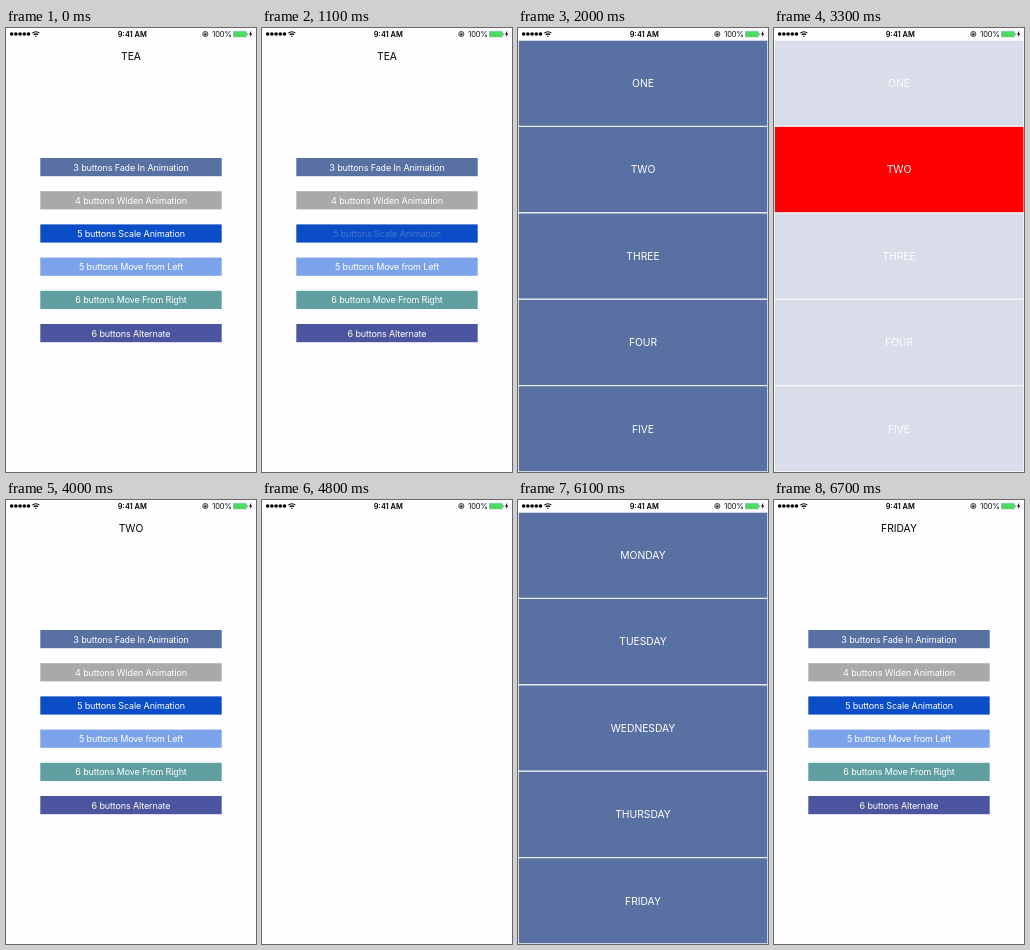
An HTML page that plays this animation: 250x444 px, repeating every 6.8 s.

```html
<!DOCTYPE html>
<html lang="en">
<head>
<meta charset="utf-8">
<title>Menu animations</title>
<style>
  html, body { margin: 0; width: 100%; height: 100%; overflow: hidden; background: #fefdff; }
  svg { display: block; width: 250px; height: 444px; }
  text { font: 10.3px Inter, Roboto, sans-serif; text-anchor: middle; }
  #buttons text { font-size: 9px; letter-spacing: -.13px; fill: #fff; }
  #rows text { fill: #fff; }
  #status text { font-size: 7.4px; }
</style>
</head>
<body>
<svg viewBox="0 0 250 444">
  <g id="menu">
    <text id="title" x="125" y="31.8"></text>
    <g id="buttons"></g>
  </g>
  <g id="rows"></g>
  <g id="status">
    <g id="dots"></g>
    <g fill="none" stroke="#000" stroke-width="1.1">
      <path d="M26.3 5.2Q29.8 2.2 33.3 5.2M27.6 6.8Q29.8 5 32 6.8"/>
      <circle cx="199.3" cy="6" r="2.6" stroke-width=".7"/>
    </g>
    <path d="M28.7 7.9Q29.8 7 30.9 7.9L29.8 9.1Z"/>
    <rect x="198.2" y="5.6" width="2.2" height="1.8"/>
    <path d="M198.6 5.7V5a.7.7 0 0 1 1.4 0v.7" fill="none" stroke="#000" stroke-width=".4"/>
    <text x="126.3" y="8.8" font-weight="600" style="font-weight:600">9:41 AM</text>
    <text x="216" y="8.8">100%</text>
    <rect x="227.2" y="3.2" width="13.4" height="5.8" rx=".8" fill="#4cd964" stroke="#9a9a9a" stroke-width=".3"/>
    <rect x="241" y="5" width=".9" height="2.2" fill="#4cd964"/>
    <path d="M245.2 2.8L243 6.5H244.5L243.9 9.3L246.3 5.5H244.8Z"/>
  </g>
</svg>
<script>
const LOOP = 6800, DURATION = 300, STAGGER = 100;
const ROW_TOP = 12, ROW_HEIGHT = 86.4, ROW_COLOR = '#5870a2';

const BUTTONS = [
  ['3 buttons Fade In Animation', '#5870a2'],
  ['4 buttons Widen Animation', '#a9a8ab'],
  ['5 buttons Scale Animation', '#0a4dc6'],
  ['5 buttons Move from Left', '#7ba3e9'],
  ['6 buttons Move From Right', '#609f9f'],
  ['6 buttons Alternate', '#4b559f']
];

const scaleIn = (p, cy) => `translate(125 ${cy}) scale(${5 - 4 * p}) translate(-125 ${-cy})`;
const slideIn = p => `translate(${250 * (p - 1)} 0)`;

// Each session: press a menu button, rows enter, one row is picked.
const SESSIONS = [
  { button: 2, press: 1000, open: 1125, tap: 3099, pick: 1, enter: scaleIn,
    labels: ['ONE', 'TWO', 'THREE', 'FOUR', 'FIVE'] },
  { button: 3, press: 4650, open: 4777, tap: 6350, pick: 4, enter: slideIn,
    labels: ['MONDAY', 'TUESDAY', 'WEDNESDAY', 'THURSDAY', 'FRIDAY'] }
];

const $ = id => document.getElementById(id);

function add(parent, tag, attrs, text = '') {
  const el = document.createElementNS('http://www.w3.org/2000/svg', tag);
  for (const name in attrs) el.setAttribute(name, attrs[name]);
  el.textContent = text;
  return parent.appendChild(el);
}

// cubic-bezier(.42, 0, .58, 1)
function ease(x) {
  if (x <= 0) return 0;
  if (x >= 1) return 1;
  let lo = 0, hi = 1, s;
  for (let i = 0; i < 20; i++) {
    s = (lo + hi) / 2;
    const bx = 1.26 * s * (1 - s) ** 2 + 1.74 * s * s * (1 - s) + s ** 3;
    if (bx < x) lo = s; else hi = s;
  }
  return s * s * (3 - 2 * s);
}

for (let i = 0; i < 5; i++) add($('dots'), 'circle', { cx: 5.7 + 4.2 * i, cy: 6, r: 1.8 });

const captions = BUTTONS.map(([label, fill], i) => {
  const y = 130 + 33.2 * i;
  add($('buttons'), 'rect', { x: 34.3, y, width: 181.4, height: 18.2, fill });
  return add($('buttons'), 'text', { x: 125, y: y + 12.5 }, label);
});

const rows = Array.from({ length: 5 }, (_, i) => {
  const y = ROW_TOP + ROW_HEIGHT * i;
  const g = add($('rows'), 'g', {});
  const box = add(g, 'rect', { x: .3, y: y + .3, width: 249.4, height: ROW_HEIGHT - .6,
    stroke: '#fff', 'stroke-width': .6 });
  const text = add(g, 'text', { x: 125, y: y + 46.9 });
  return { g, box, text, cy: y + ROW_HEIGHT / 2 };
});

function render(t) {
  const current = SESSIONS.find(s => t >= s.open && t < s.tap + DURATION);
  const last = SESSIONS.filter(s => t >= s.tap + DURATION).pop();

  $('menu').style.display = current ? 'none' : '';
  $('rows').style.display = current ? '' : 'none';
  $('title').textContent = last ? last.labels[last.pick] : 'TEA';
  captions.forEach((c, i) => {
    const pressed = SESSIONS.some(s => s.button === i && t >= s.press && t < s.open);
    c.setAttribute('opacity', pressed ? .22 : 1);
  });

  if (!current) return;
  rows.forEach(({ g, box, text, cy }, i) => {
    const p = ease((t - current.open - STAGGER * i) / DURATION);
    const picked = t >= current.tap && i === current.pick;
    const fade = picked ? 0 : ease((t - current.tap) / DURATION);
    g.setAttribute('transform', current.enter(p, cy));
    g.setAttribute('opacity', p * (1 - fade));
    box.setAttribute('fill', picked ? '#f00' : ROW_COLOR);
    text.textContent = current.labels[i];
  });
}

function tick() {
  render(performance.now() % LOOP);
  requestAnimationFrame(tick);
}
tick();
</script>
</body>
</html>
```
